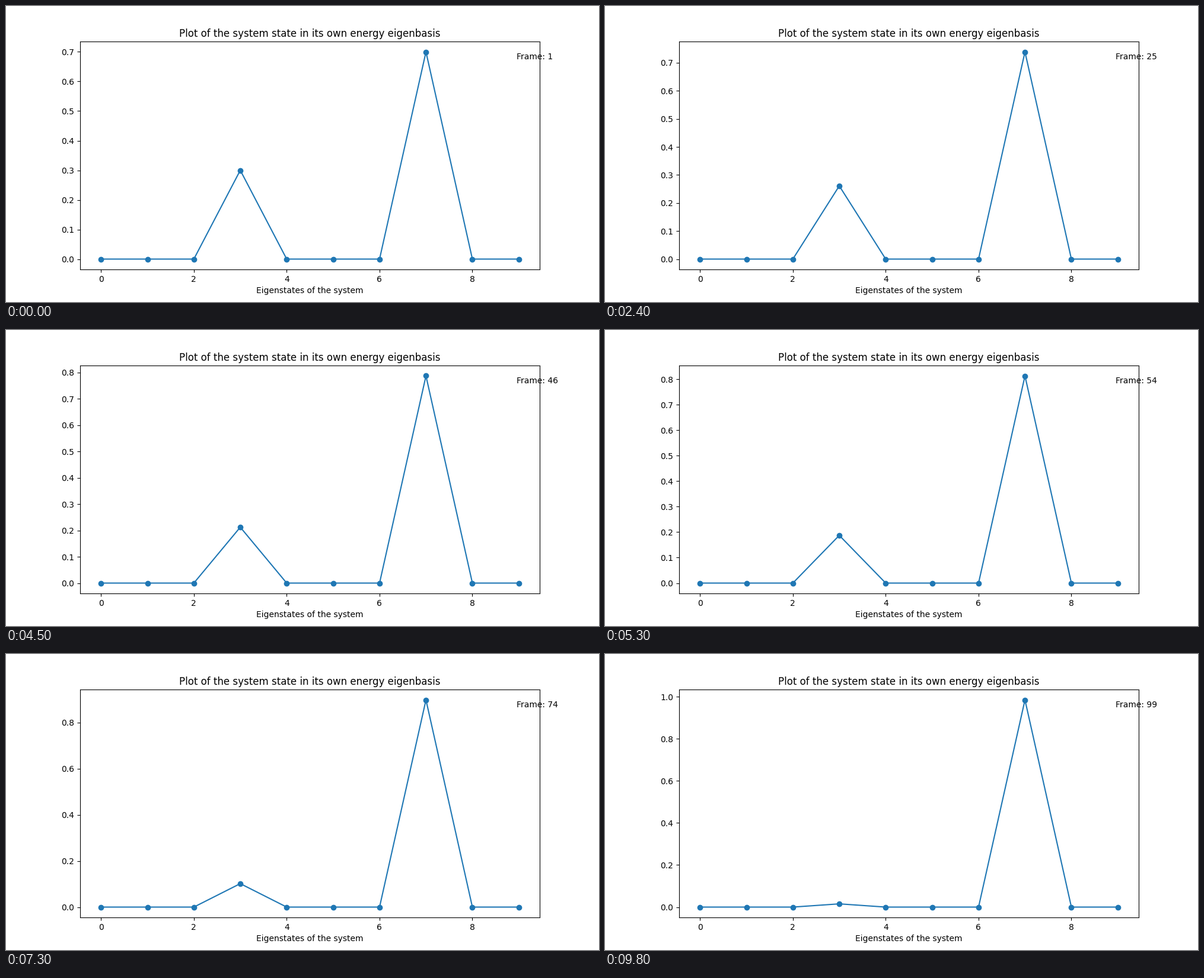
Recreate the animation shown at these times as a matplotlib script. Size 1000x500 px, loop 9.9 s.

```python
import numpy as np
import matplotlib.pyplot as plt
from matplotlib.animation import FuncAnimation

FRAMES, INTERVAL = 99, 100
STATES = np.arange(10)
LOW, HIGH = 3, 7  # the two occupied eigenstates


def progress(p):
    """Time (up to scale) for dp/dt = p^9 (1 - p) to reach probability p."""
    return np.log(p / (1 - p)) - sum(1 / (k * p**k) for k in range(1, 9))


# Probability of the growing state at a few steps, joined along the growth law
key_steps = np.array([0, 14, 24, 45, 62, 85, 98])
key_probs = np.array([0.7, 0.7216, 0.739, 0.7876, 0.8464, 0.9535, 0.9847])
grid = np.linspace(key_probs[0], key_probs[-1], 4000)
grid_steps = np.interp(progress(grid), progress(key_probs), key_steps)
growth = np.interp(np.arange(FRAMES), grid_steps, grid)


def probabilities(step):
    values = np.zeros(len(STATES))
    values[HIGH] = growth[step]
    values[LOW] = 1 - growth[step]
    return values


plt.rcParams["font.family"] = "DejaVu Sans"
fig, ax = plt.subplots(figsize=(10, 5), dpi=100)
line, = ax.plot(STATES, probabilities(0), "o-", color="tab:blue")
ax.set_title("Plot of the system state in its own energy eigenbasis")
ax.set_xlabel("Eigenstates of the system")
counter = ax.text(0.95, 0.95, "", transform=ax.transAxes, va="top")


def update(step):
    line.set_ydata(probabilities(step))
    ax.relim()
    ax.autoscale_view()
    counter.set_text(f"Frame: {step + 1}")
    return line, counter


anim = FuncAnimation(fig, update, frames=FRAMES, interval=INTERVAL,
                     repeat=True, repeat_delay=0, blit=False)
plt.show()
```
